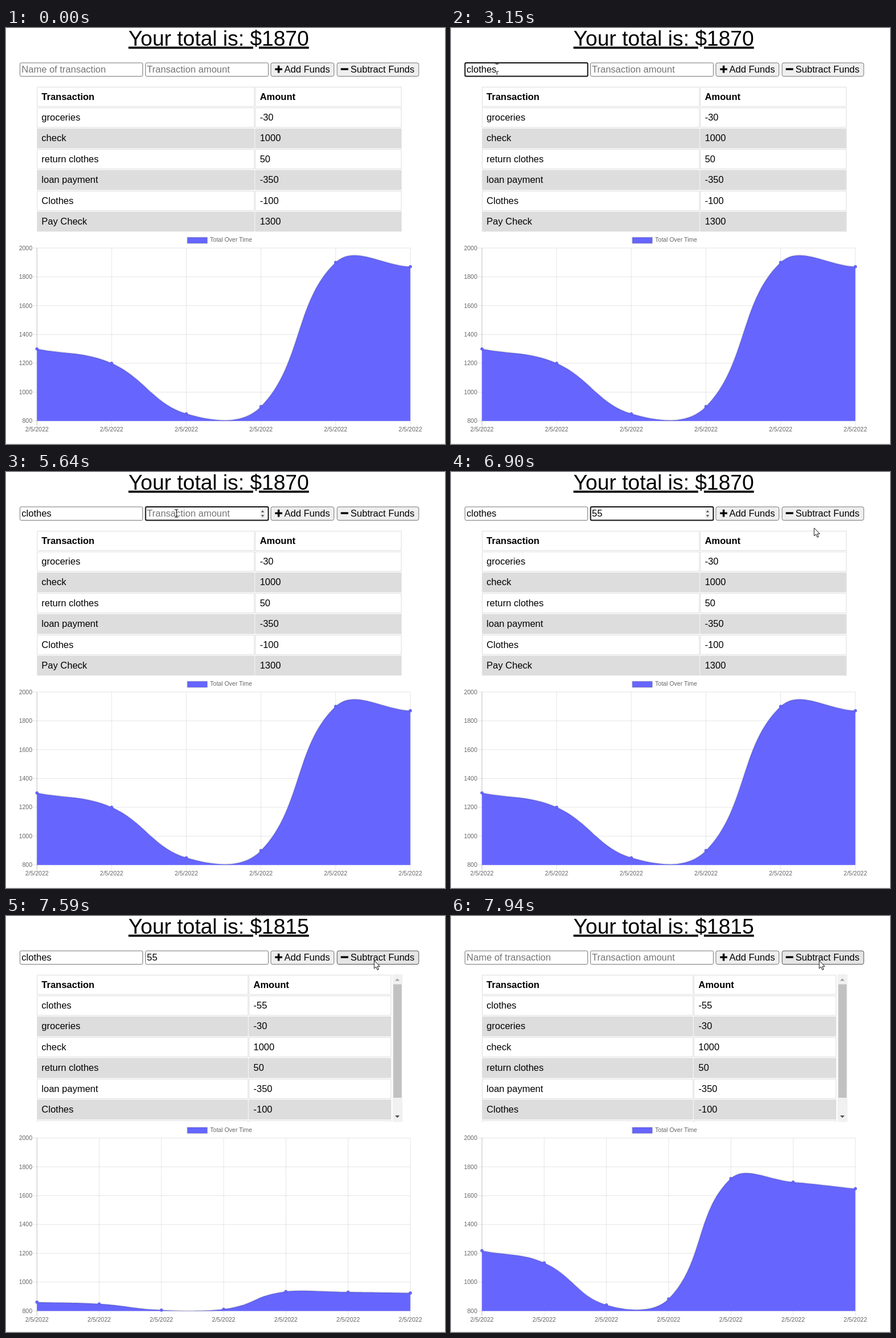
These frames come from a looping animation (769 by 728 pixels, 8000 ms). An HTML page:

```html
<!DOCTYPE html>
<html lang="en">
<head>
<meta charset="utf-8">
<title>Budget tracker</title>
<style>
  html, body { margin: 0; width: 100%; height: 100%; overflow: hidden; background: #fff; }
  svg { display: block; width: 769px; height: 728px; font: 16.5px "Liberation Sans", Arial, sans-serif; }
  .title { font-size: 37.1px; text-decoration: underline; }
  .head { font-weight: bold; }
  .small { font-size: 10.5px; fill: #666; }
  .beam { fill: none; stroke: #fff; mix-blend-mode: difference; }
</style>
</head>
<body>
<svg id="stage" viewBox="0 0 769 728"></svg>
<script>
const LOOP = 8000, BLINK = 530, PRESS = 7460, UPDATE = 7590, CLEAR = 7730;
const BLUE = '#6666ff';
const FIELDS = [
  { x: 24, textX: 27.3, hint: 'Name of transaction', value: 'clothes',
    focus: 1200, blur: 5110, keys: [2280, 2350, 2550, 2690, 2820, 2950, 3150] },
  { x: 244, textX: 246.8, hint: 'Transaction amount', value: '55', spinner: true,
    focus: 5110, blur: PRESS, keys: [5910, 6040] }
];
const ENTRIES = [['groceries', -30], ['check', 1000], ['return clothes', 50],
  ['loan payment', -350], ['Clothes', -100], ['Pay Check', 1300]];
const TOTALS = [1300, 1200, 850, 900, 1900, 1870];
// time, x, y of the pointer hot spot
const POINTER = [
  [0, 660, 760], [119, 640, 740], [120, 638, 712], [400, 0, 185], [460, -20, 170],
  [800, -20, 75], [810, 1, 73], [870, 70, 72], [1010, 88, 62], [1330, 80, 69],
  [3820, 80, 69], [3890, 76, 80], [3960, 95, 88], [4100, 190, 70], [4300, 280, 34],
  [4450, 300, 48], [4630, 301, 64], [4760, 306, 52], [4970, 300, 70], [5310, 298, 72],
  [6560, 298, 72], [6620, 372, 78], [6690, 468, 94], [6760, 545, 105], [6830, 602, 106],
  [6900, 636, 98], [7040, 650, 90], [7320, 645, 78], [LOOP, 645, 78]
];

function add(parent, tag, attrs = {}, text) {
  const node = document.createElementNS('http://www.w3.org/2000/svg', tag);
  set(node, attrs);
  if (text !== undefined) node.textContent = text;
  return parent.appendChild(node);
}
function set(node, attrs) {
  for (const name in attrs) node.setAttribute(name, attrs[name]);
}
const show = (node, on) => set(node, { display: on ? 'inline' : 'none' });
const box = (parent, x, y, width, height, attrs) =>
  add(parent, 'rect', { x, y, width, height, ...attrs });
const label = (parent, x, y, text, attrs) => add(parent, 'text', { x, y, ...attrs }, text);
const inside = (p, x, width) => p.x >= x && p.x <= x + width && p.y >= 61 && p.y <= 85;

const stage = document.getElementById('stage');
box(stage, 0, 0, 769, 728, { fill: '#fff' });
box(stage, 0, 727, 769, 1, { fill: '#eef2f3' });
const title = label(stage, 214.5, 30.6, '', { class: 'title' });

function makeField(field) {
  const frame = box(stage, field.x + .5, 61, 215, 23.5, { rx: 2, fill: '#fff' });
  const text = label(stage, field.textX, 78, '');
  const caret = box(stage, 0, 64, 1, 18);
  const spinner = add(stage, 'g');
  if (field.spinner) {
    box(spinner, 445, 63.5, 9.5, 18.5, { fill: '#efefef' });
    add(spinner, 'path', { d: 'M446.7 70.5h5.6l-2.8-3.5zM446.7 75.3h5.6l-2.8 3.5z', fill: '#505050' });
  }
  return { ...field, frame, text, caret, spinner };
}
function makeButton(x, width, textX, text, icon) {
  const frame = box(stage, x + .5, 61, width, 23.5, { rx: 3 });
  add(stage, 'path', { d: icon, stroke: '#000', 'stroke-width': 3.4, 'stroke-linejoin': 'round' });
  label(stage, textX, 78, text);
  return { x, width, frame };
}
const fields = FIELDS.map(makeField);
const buttons = [
  makeButton(463.5, 110.5, 487.6, 'Add Funds', 'M471.3 72.1h12.6M477.6 65.8v12.6'),
  makeButton(579.5, 143, 603.6, 'Subtract Funds', 'M586.5 72h13')
];

function makeTable(parent, entries, split, right) {
  const clip = add(parent, 'svg', { width: 769, height: 360.5 });
  [['Transaction', 'Amount'], ...entries].forEach((row, i) => {
    const y = 103.4 + 36.4 * i;
    const look = { fill: i && i % 2 === 0 ? '#ddd' : '#fff', stroke: '#ddd' };
    const type = { class: i ? '' : 'head' };
    box(clip, 54.8, y, split - 54.8, 34, look);
    box(clip, split + 1.8, y, right - split - 1.8, 34, look);
    label(clip, 62.3, y + 22.1, row[0], type);
    label(clip, split + 9.7, y + 22.1, row[1], type);
  });
}

function makeScrollbar(parent) {
  box(parent, 677, 102, 17.5, 258.5, { fill: '#f1f1f1' });
  box(parent, 678.5, 119.5, 14.5, 198.5, { fill: '#c1c1c1' });
  add(parent, 'path', { d: 'M681.5 113.5h8l-4-4.3z', fill: '#a3a3a3' });
  add(parent, 'path', { d: 'M681.5 349h8l-4 4.3z', fill: '#505050' });
}

function makeChart(parent, totals, top) {
  const left = 54.2, right = 708.3, base = top + 302.7;
  const step = (right - left) / (totals.length - 1);
  const edge = { stroke: '#000', 'stroke-opacity': .1 };
  box(parent, 317.6, top - 18.6, 35, 10.4, { fill: BLUE, ...edge, 'stroke-width': 2.4 });
  label(parent, 357.6, top - 10.6, 'Total Over Time', { class: 'small' });
  for (let i = 0; i <= 6; i++) {
    const y = top + 302.7 * i / 6;
    add(parent, 'path', { d: `M46 ${y}H${right}`, ...edge });
    label(parent, 46, y + 3.6, 2000 - 200 * i, { class: 'small', 'text-anchor': 'end' });
  }
  const points = totals.map((v, i) => [left + step * i, base - (v - 800) * 302.7 / 1200]);
  points.forEach(([x], i) => {
    add(parent, 'path', { d: `M${x} ${top}V${base + 8.5}`, ...edge, 'stroke-opacity': i ? .1 : .25 });
    label(parent, x, base + 18.3, '2/5/2022', { class: 'small', 'text-anchor': 'middle' });
  });

  // Spline handles weighted by the distance to each neighbour
  const handles = points.map((p, i) => {
    const prev = points[i - 1] || p, next = points[i + 1] || p;
    const before = Math.hypot(p[0] - prev[0], p[1] - prev[1]);
    const after = Math.hypot(next[0] - p[0], next[1] - p[1]);
    const at = weight => p.map((v, k) => v + .4 * weight / (before + after) * (next[k] - prev[k]));
    return { into: at(-before), out: at(after) };
  });
  const area = add(parent, 'path', { fill: BLUE });
  const line = add(parent, 'path', { fill: 'none', ...edge, 'stroke-width': 2.6 });
  const dots = points.map(([x]) => add(parent, 'circle', { cx: x, r: 2.7, fill: BLUE, ...edge }));

  return grow => {
    const lift = y => base - (base - y) * grow;
    const pair = ([x, y]) => `${x} ${lift(y)}`;
    const curve = points.map((p, i) => i
      ? `C${pair(handles[i - 1].out)} ${pair(handles[i].into)} ${pair(p)}`
      : `M${pair(p)}`).join('');
    set(line, { d: curve });
    set(area, { d: `${curve}V${base}H${left}Z` });
    dots.forEach((dot, i) => set(dot, { cy: lift(points[i][1]) }));
  };
}

const before = add(stage, 'g'), after = add(stage, 'g');
makeTable(before, ENTRIES, 435, 692.4);
makeChart(before, TOTALS, 385)(1);
makeTable(after, [['clothes', -55], ...ENTRIES], 423.8, 674.4);
makeScrollbar(after);
const drawChart = makeChart(after, [...TOTALS, 1815], 388.5);

const beam = add(stage, 'path', { class: 'beam', d: 'M-2.5-6.5h6M.5-6.5v13M-2.5 6.5h6' });
const arrow = add(stage, 'path', {
  d: 'M0 0V14L3.2 11L5.6 16.3L7.8 15.3L5.5 10.2H9.8Z', fill: '#fff', stroke: '#111'
});

function pointerAt(t) {
  const i = POINTER.findIndex(k => k[0] > t);
  const [t0, x0, y0] = POINTER[i - 1], [t1, x1, y1] = POINTER[i];
  const part = (t - t0) / (t1 - t0);
  return { x: x0 + (x1 - x0) * part, y: y0 + (y1 - y0) * part };
}

function drawField(field, t, pointer) {
  const typed = t < CLEAR ? field.keys.filter(k => k <= t).length : 0;
  const focused = t >= field.focus && t < field.blur;
  const content = field.value.slice(0, typed);
  field.text.textContent = content || field.hint;
  set(field.text, { fill: content ? '#000' : '#757575' });
  set(field.frame, { stroke: focused ? '#101010' : '#767676', 'stroke-width': focused ? 2 : 1 });
  const since = t - (typed ? field.keys[typed - 1] : field.focus);
  show(field.caret, focused && Math.floor(since / BLINK) % 2 === 0);
  const width = content ? field.text.getComputedTextLength() : 0;
  set(field.caret, { x: Math.ceil(field.textX + width) });
  show(field.spinner, focused || inside(pointer, field.x, 215));
}

function drawButton(button, t, pointer) {
  const hover = inside(pointer, button.x, button.width);
  const pressed = hover && t >= PRESS && t < UPDATE;
  set(button.frame, {
    fill: pressed ? '#f5f5f5' : hover ? '#e5e5e5' : '#efefef',
    stroke: pressed ? '#8d8d8d' : hover ? '#4f4f4f' : '#767676'
  });
}

function draw(t) {
  const pointer = pointerAt(t), updated = t >= UPDATE;
  const total = updated ? 'Your total is: $1815' : 'Your total is: $1870';
  if (title.textContent !== total) title.textContent = total;
  fields.forEach(field => drawField(field, t, pointer));
  buttons.forEach(button => drawButton(button, t, pointer));
  show(before, !updated);
  show(after, updated);
  if (updated) {
    const tick = UPDATE + 70 * Math.floor((t - UPDATE) / 70);
    drawChart(1 - (1 - (tick - 7556) / 1057) ** 4);
  }
  const overText = fields.some(field => inside(pointer, field.x, 215));
  show(beam, overText);
  show(arrow, !overText);
  set(beam, { transform: `translate(${Math.round(pointer.x)} ${Math.round(pointer.y) + .5})` });
  set(arrow, { transform: `translate(${pointer.x} ${pointer.y})` });
}

const start = performance.now();
function frame() {
  draw((performance.now() - start) % LOOP);
  requestAnimationFrame(frame);
}
frame();
</script>
</body>
</html>
```
